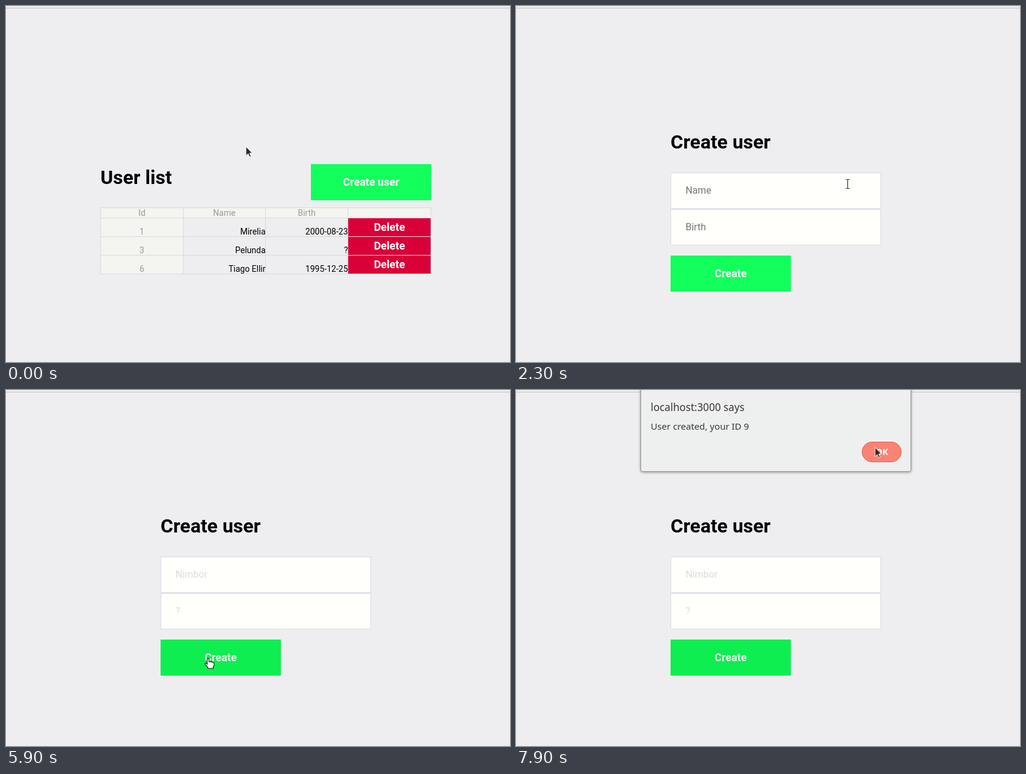
Animation, 838 px wide and 592 px high, one loop 8 s. Source, as an HTML page:

```html
<!DOCTYPE html>
<html lang="en">
<head>
<meta charset="utf-8">
<title>User list</title>
<style>
  html, body { margin: 0; width: 100%; height: 100%; overflow: hidden; background: #eeeef0; }
  svg { display: block; width: 838px; height: 592px; font: 16px Roboto, sans-serif; }
  .title { font-size: 32px; font-weight: 700; }
  .button { font-size: 18px; font-weight: 700; fill: #fff; text-anchor: middle; }
  .green rect { fill: #12ff5c; }
  .green.hover rect { fill: #0eee50; }
  .green.hover text { fill: #e9f3ea; }
  .cell { font-size: 14px; }
  .muted { fill: #999; }
  .field { fill: #fffffb; stroke: #d9d9e5; }
  .hint { fill: #757575; }
  .entry { fill: #dcdcdc; }
  #dialog { font-family: "Noto Sans", sans-serif; fill: #3a3638; }
  #panel { fill: #eef0ef; stroke: #929292; filter: drop-shadow(0 1px 2px #0006); }
  #ok rect { fill: #df2c00; stroke: #d9a79b; }
  #ok.hover rect { fill: #f98475; stroke: #ea5a4f; }
  #ok text { fill: #fff; font-size: 14.5px; font-weight: 700; text-anchor: middle; }
</style>
</head>
<body>
<svg viewBox="0 0 838 592">
  <rect width="838" height="592" fill="#eeeef0"/>
  <rect y="3" width="838" height="1" fill="#c1c1c2"/>

  <g id="list">
    <text class="title" x="157" y="296">User list</text>
    <g id="open" class="green">
      <rect x="507" y="263" width="200" height="60"/>
      <text class="button" x="607" y="299">Create user</text>
    </g>
    <g id="table"></g>
  </g>

  <g id="form">
    <text class="title" x="257" y="237">Create user</text>
    <rect class="field" x="257.5" y="277.5" width="349" height="59"/>
    <rect class="field" x="257.5" y="338.5" width="349" height="59"/>
    <text id="name" x="282" y="312"></text>
    <text id="birth" x="282" y="373"></text>
    <rect id="caret" width="1" height="19" fill="#c4c4c4"/>
    <g id="create" class="green">
      <rect x="257" y="415" width="200" height="60"/>
      <text class="button" x="357" y="451">Create</text>
    </g>
  </g>

  <g id="dialog">
    <path id="panel" d="M207.5-9V132.500q0 3 3 3H653.500q3 0 3-3V-9z"/>
    <text x="224" y="35" font-size="17.2">localhost:3000 says</text>
    <text x="224" y="66" font-size="15.1">User created, your ID 9</text>
    <g id="ok">
      <rect x="575.500" y="86.500" width="65" height="33" rx="16.500"/>
      <text x="608" y="108">OK</text>
    </g>
  </g>

  <g id="cursor">
    <path id="arrow" d="M0 0V15L3.600 11.700 6 17 8.400 16 6.100 10.800H10.500z" fill="#2b2b2b" stroke="#fff" stroke-width=".9"/>
    <path id="hand" d="M-1.500 1.500Q0-.8 1.500 1.500V6Q3 4.800 4.300 6.300 6 5.200 7.200 7 9.300 6.200 10 8.500V12L8.500 14.500V17H-.5V15L-5.500 9.500Q-5 7.500-3.500 8.300L-1.500 10z" fill="#fff" stroke="#111" stroke-width="1.100"/>
    <g id="beam" fill="none">
      <path d="M-3-7.500H-1L0-7 1-7.500H3M0-7V7M-3 7.500H-1L0 7 1 7.500H3" stroke="#fff" stroke-width="2.400"/>
      <path d="M-3-7.500H-1L0-7 1-7.500H3M0-7V7M-3 7.500H-1L0 7 1 7.500H3" stroke="#222" stroke-width="1.100"/>
    </g>
  </g>
</svg>
<script>
const LOOP = 8000;
const $ = id => document.getElementById(id);

// Table markup
const rect = (x, y, w, h, fill) => `<rect x="${x}" y="${y}" width="${w}" height="${h}" fill="${fill}"/>`;
const label = (x, y, text, cls, anchor = 'middle') =>
  `<text x="${x}" y="${y}" class="${cls}" text-anchor="${anchor}">${text}</text>`;

const columns = [157, 294, 431, 568, 706];
const rowLines = [335, 352, 383, 414, 445];
const users = [[1, 'Mirelia', '2000-08-23'], [3, 'Pelunda', '?'], [6, 'Tiago Ellir', '1995-12-25']];

$('table').innerHTML =
  rect(157, 335, 550, 17, '#f4f5f0') + rect(157, 352, 137, 94, '#f4f5f0') +
  columns.map(x => rect(x, 335, 1, 111, '#dadada')).join('') +
  rowLines.map(y => rect(157, y, 550, 1, '#dadada')).join('') +
  ['Id', 'Name', 'Birth'].map((text, i) => label(226 + 137 * i, 349, text, 'cell muted')).join('') +
  users.map(([id, name, birth], i) => {
    const y = 352 + 31 * i;
    return rect(569, y + 1, 137, 30, '#d90038') +
      label(226, y + 28, id, 'cell muted') +
      label(431.5, y + 28, name, 'cell', 'end') +
      label(568.5, y + 28, birth, 'cell', 'end') +
      label(637.5, y + 22, 'Delete', 'button');
  }).join('');

// Step tables: each row holds from its time until the next row
const cursorSteps = [
  [0, 399, 234, 'arrow'], [400, 406, 238, 'arrow'], [500, 440, 254, 'arrow'],
  [600, 492, 276, 'arrow'], [700, 538, 290, 'hand'], [800, 553, 294, 'hand'],
  [900, 551.5, 296, 'beam'], [4000, 540, 301, 'beam'], [4100, 500, 320, 'beam'],
  [4200, 440, 349, 'beam'], [4300, 395, 369, 'beam'], [4400, 379.5, 374, 'beam'],
  [5600, 376, 386, 'beam'], [5700, 363, 415, 'hand'], [5800, 345, 438, 'hand'],
  [5900, 336, 446, 'hand'], [6900, 345, 385, 'arrow'], [7000, 385, 190, 'arrow'],
  [7100, 407, 55, 'arrow'], [7300, 406.5, 53, 'arrow'], [7400, 425, 57, 'arrow'],
  [7500, 470, 68, 'arrow'], [7600, 525, 82, 'arrow'], [7700, 570, 91, 'arrow'],
  [7800, 591, 95, 'arrow'], [7900, 597, 95.5, 'arrow']
];
const nameSteps = [[0, 0], [2600, 1], [3000, 2], [3100, 3], [3300, 4], [3400, 6]];
const caretSteps = [
  [0, ''], [1700, 'name'], [2300, ''], [2600, 'name'], [4400, ''],
  [4900, 'birth'], [5100, ''], [5500, 'birth'], [5900, '']
];
const dialogSteps = [[0, 0, 0], [6400, .6, -7], [6500, 1, -4], [6900, 1, 0]];

const at = (steps, t) => steps.findLast(step => step[0] <= t);
const show = (id, on) => $(id).style.display = on ? '' : 'none';

function fill(id, value, hint) {
  $(id).textContent = value || hint;
  $(id).setAttribute('class', value ? 'entry' : 'hint');
}

function render(t) {
  show('list', t < 900);
  show('form', t >= 900);
  $('open').classList.toggle('hover', t >= 700);
  $('create').classList.toggle('hover', t >= 5700);
  $('ok').classList.toggle('hover', t >= 7800);

  const typed = {
    name: 'Nimbor'.slice(0, at(nameSteps, t)[1]),
    birth: t >= 5500 ? '?' : ''
  };
  fill('name', typed.name, 'Name');
  fill('birth', typed.birth, 'Birth');

  const focus = at(caretSteps, t)[1];
  show('caret', focus);
  if (focus) {
    const width = typed[focus] ? $(focus).getComputedTextLength() : 0;
    $('caret').setAttribute('x', Math.round(282 + width));
    $('caret').setAttribute('y', focus === 'name' ? 297 : 358);
  }

  const [, opacity, shift] = at(dialogSteps, t);
  show('dialog', opacity);
  $('dialog').setAttribute('opacity', opacity);
  $('dialog').setAttribute('transform', `translate(0 ${shift})`);

  const [, x, y, kind] = at(cursorSteps, t);
  $('cursor').setAttribute('transform', `translate(${x} ${y})`);
  for (const shape of ['arrow', 'hand', 'beam']) show(shape, shape === kind);
}

const start = performance.now();
function tick(now) {
  render(Math.max(0, now - start) % LOOP);
  requestAnimationFrame(tick);
}
render(0);
requestAnimationFrame(tick);
</script>
</body>
</html>
```
